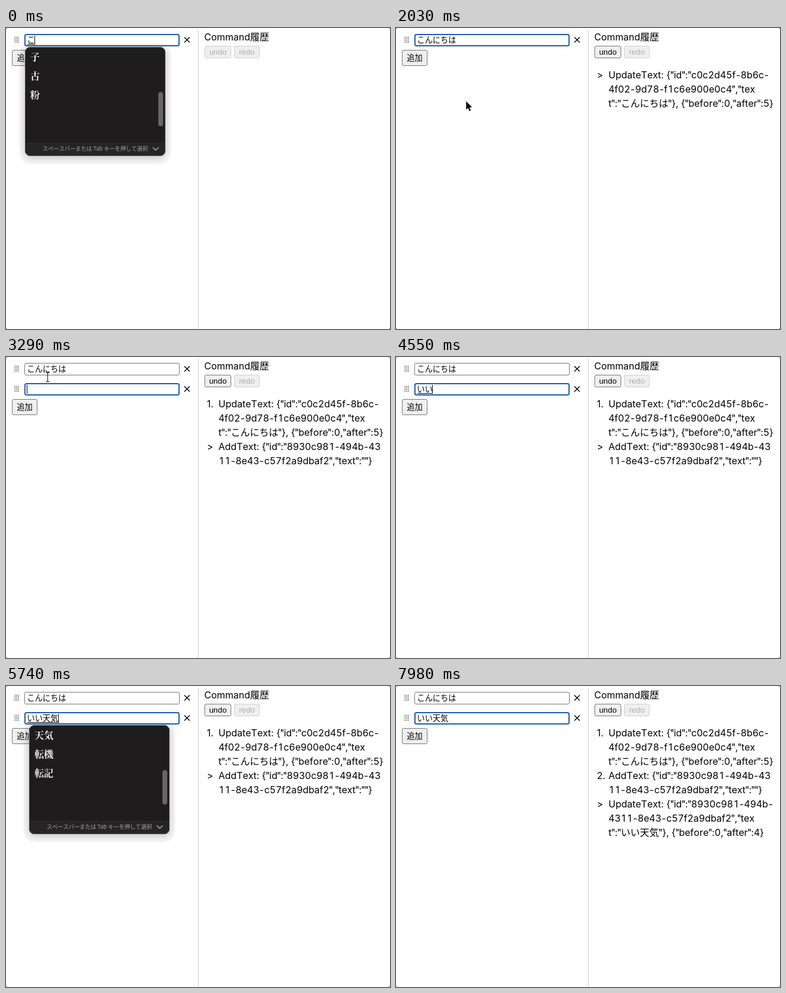
An HTML page with a canvas for the animation above (8000 ms loop, 648 by 508 pixels).

```html
<!DOCTYPE html>
<html lang="ja">
<head>
<meta charset="utf-8">
<title>Command履歴</title>
<style>
html, body { margin: 0; width: 100%; height: 100%; overflow: hidden; background: #fff; }
canvas { display: block; }
</style>
</head>
<body>
<canvas id="stage" width="648" height="508"></canvas>
<script>
const W = 648, H = 508, LOOP = 8000, TICK = 70, ROW = 34;
const ctx = document.getElementById('stage').getContext('2d');
const CJK = '"Noto Sans CJK JP", "Noto Sans CJK", sans-serif';
const BODY = '16px Inter, ' + CJK;
const FIELD = '13.2px ' + CJK;
const MINCHO = 'bold 16px "Noto Serif CJK JP", "Noto Sans CJK JP", serif';

// [time, row, text, composing, caret index (defaults to the end)]
const edits = [
  [0, 0, 'こ', true], [140, 0, 'こn', true], [280, 0, 'こん', true],
  [420, 0, 'こんn', true], [490, 0, 'こんに', true], [700, 0, '今に', true],
  [910, 0, 'こんにち', true], [980, 0, 'こんにちは', true], [1260, 0, 'こんにちは', false],
  [2940, 1, '', false], [4480, 1, 'い', true], [4550, 1, 'いい', true],
  [5040, 1, 'いいて', true], [5180, 1, 'いいてn', true], [5250, 1, 'いいてん', true],
  [5320, 1, 'いいてんk', true], [5530, 1, 'いい天気', true], [5950, 1, 'いい天気', false],
  [7070, 1, 'いい天気', false, 3], [7140, 1, 'いい天気', false, 2],
  [7280, 1, 'いい天気', false, 1], [7420, 1, 'いい天気', false, 0]
];
const caretFlips = [0, 1820, 2310, 2800, 2940, 3500, 3990, 6440, 7000, 7980];

const popups = [
  [0, 140, 0, 0, ['子', '古', '粉']],
  [4830, 5040, 7, ROW, ['良い', '言い', '井伊']],
  [5740, 5950, 7, ROW, ['天気', '転機', '転記']]
];

const history = [
  [1260, ['UpdateText: {"id":"c0c2d45f-8b6c-', '4f02-9d78-f1c6e900e0c4","tex', 't":"こんにちは"}, {"before":0,"after":5}']],
  [2940, ['AddText: {"id":"8930c981-494b-43', '11-8e43-c57f2a9dbaf2","text":""}']],
  [5950, ['UpdateText: {"id":"8930c981-494b-', '4311-8e43-c57f2a9dbaf2","tex', 't":"いい天気"}, {"before":0,"after":4}']]
];

function box(x, y, w, h, r, fill, stroke, line = 1) {
  ctx.beginPath();
  ctx.roundRect(x, y, w, h, r);
  if (fill) { ctx.fillStyle = fill; ctx.fill(); }
  if (stroke) { ctx.strokeStyle = stroke; ctx.lineWidth = line; ctx.stroke(); }
}

function path(points, color, line) {
  ctx.beginPath();
  points.forEach(([x, y]) => ctx.lineTo(x, y));
  ctx.strokeStyle = color;
  ctx.lineWidth = line;
  ctx.stroke();
}

function text(str, x, y, font, color = '#000', align = 'left') {
  ctx.font = font;
  ctx.fillStyle = color;
  ctx.textAlign = align;
  ctx.fillText(str, x, y);
}

// Even figures, tight quotes and long hyphens; letters keep their own advance.
function jsonText(str, x, y) {
  ctx.font = BODY;
  for (const c of str) {
    const own = ctx.measureText(c).width;
    const adv = /\d/.test(c) ? 10.25 : c === '"' ? 5.6 : c === '-' ? 8.3 : own;
    text(c, x + (adv - own) / 2, y, BODY);
    x += adv;
  }
}

function button(label, x, y, w, h, baseline, font, enabled = true, fill = '#efefef') {
  box(x + .5, y + .5, w - 1, h - 1, 2.5, fill, enabled ? '#767676' : '#d0d0d0');
  text(label, x + w / 2, y + baseline, font, enabled ? '#000' : '#adadad', 'center');
}

function field(row, str, focused) {
  const y = row * ROW;
  for (let i = 0; i < 12; i++) {
    ctx.fillStyle = '#555';
    ctx.fillRect(14.4 + i % 3 * 2.8, 14.8 + Math.floor(i / 3) * 2.8, 1.5, 1.5);
  }
  if (focused) box(32, y + 11, 260, 19, 2.5, '#fff', '#1d5dab', 2);
  else box(31.5, y + 10.5, 261, 20, 2.5, '#fff', '#767676');
  text(str, 35.5, y + 24.5, FIELD);
}

function handles(row) {
  const y = row * ROW;
  ctx.fillStyle = '#555';
  for (let i = 0; i < 12; i++) {
    ctx.fillRect(14.4 + i % 3 * 2.8, y + 14.8 + Math.floor(i / 3) * 2.8, 1.5, 1.5);
  }
  path([[301, y + 15.5], [310, y + 24.5]], '#000', 1.4);
  path([[310, y + 15.5], [301, y + 24.5]], '#000', 1.4);
}

function caretX(str) {
  ctx.font = FIELD;
  return Math.round(34.8 + ctx.measureText(str).width);
}

function popup(dx, dy, words) {
  ctx.save();
  ctx.translate(dx, dy);
  box(23, 27, 255, 202, 18, 'rgba(0,0,0,.035)');
  ctx.save();
  ctx.shadowColor = 'rgba(0,0,0,.22)';
  ctx.shadowBlur = 14;
  ctx.shadowOffsetY = 3;
  box(32, 32, 237, 184, 9, '#1e1c1d');
  ctx.restore();
  box(32, 193, 237, 23, [0, 0, 9, 9], '#262525');
  box(32.5, 32.5, 236, 183, 8.5, null, '#484647');
  words.forEach((w, i) => text(w, 41, 55 + i * 32, MINCHO, '#f4f4f4'));
  box(257, 108, 8, 58, 4, '#676566');
  text('スペースバーまたは Tab キーを押して選択', 150.5, 207, '9.3px ' + CJK, '#a3a2a2', 'center');
  path([[247.5, 201.5], [252.5, 206.3], [257.5, 201.5]], '#b4b4b4', 1.3);
  ctx.restore();
}

function arrow(x, y) {
  ctx.beginPath();
  [[0, 0], [0, 14], [3.2, 11], [5.6, 16.6], [8, 15.6], [5.6, 10.2], [10, 10]]
    .forEach(([px, py]) => ctx.lineTo(x + px, y + py));
  ctx.closePath();
  ctx.lineJoin = 'round';
  ctx.strokeStyle = '#fff';
  ctx.lineWidth = 2;
  ctx.stroke();
  ctx.fillStyle = '#000';
  ctx.fill();
}

function beam(x, y) {
  path([[x - 3, y - 8], [x, y - 7], [x + 3, y - 8]], '#000', 1);
  path([[x, y - 7], [x, y + 7]], '#000', 1);
  path([[x - 3, y + 8], [x, y + 7], [x + 3, y + 8]], '#000', 1);
}

function progress(t, from, to) {
  const p = Math.min(1, Math.max(0, (t - from) / (to - from)));
  return p * p * (3 - 2 * p);
}

function pointer(t) {
  if (t >= 2030 && t < 2940) {
    const p = progress(t, 1960, 2800);
    if (t >= 2800) {
      ctx.beginPath();
      ctx.arc(36, 59, 20, 0, 7);
      ctx.fillStyle = 'rgba(255,255,255,.3)';
      ctx.fill();
      ctx.strokeStyle = '#000';
      ctx.lineWidth = 3;
      ctx.stroke();
    }
    arrow(120 - 84 * p, 125 - 67 * p);
  } else if (t >= 2940 && t < 4480) {
    const p = progress(t, 2870, 3500), q = 1 - p;
    beam(q * q * 36 + 2 * p * q * 66 + p * p * 77.5, q * q * 58 + 2 * p * q * 2 + p * p * 53.5);
  }
}

function corners() {
  ctx.beginPath();
  ctx.rect(0, 0, W, H);
  ctx.roundRect(0, 0, W, H, 3);
  ctx.fillStyle = '#777';
  ctx.fill('evenodd');
}

function draw(t) {
  ctx.fillStyle = '#fff';
  ctx.fillRect(0, 0, W, H);
  ctx.fillStyle = '#ccc';
  ctx.fillRect(324, 3, 1, H - 3);

  const values = [''];
  let now;
  for (const e of edits) {
    if (e[0] > t) break;
    now = e;
    values[e[1]] = e[2];
  }
  const [, row, value, composing, index = value.length] = now;
  const pressed = t >= 2800 && t < 2940;

  values.forEach((v, i) => {
    handles(i);
    const y = i * ROW, focused = i === row && !pressed;
    if (focused) box(32, y + 11, 260, 19, 2.5, '#fff', '#1d5dab', 2);
    else box(31.5, y + 10.5, 261, 20, 2.5, '#fff', '#767676');
    text(v, 35.5, y + 24.5, FIELD);
  });
  ctx.fillStyle = '#000';
  if (composing) ctx.fillRect(36, row * ROW + 27, caretX(value) - 36, 1);
  if (caretFlips.filter(f => f <= t).length % 2) {
    ctx.fillRect(caretX(value.slice(0, index)), row * ROW + 13, 1, 15);
  }
  button('追加', 10, 3 + ROW * values.length, 43, 27, 18, '13.333px ' + CJK, true, pressed ? '#f5f5f5' : '#efefef');

  const label = '13.333px "Liberation Sans", Arial, sans-serif';
  text('Command履歴', 334.5, 21, BODY);
  button('undo', 335, 30, 45, 21, 15, label, t >= 1260);
  button('redo', 385, 30, 43, 21, 15, label, false);

  const shown = history.filter(h => h[0] <= t);
  let y = 85;
  shown.forEach(([, lines], i) => {
    text(i === shown.length - 1 ? '>' : i + 1 + '.', 339, y, BODY);
    for (const line of lines) {
      jsonText(line, 358.5, y);
      y += 24;
    }
  });

  for (const [from, to, dx, dy, words] of popups) {
    if (t >= from && t < to) popup(dx, dy, words);
  }
  pointer(t);
  corners();
}

const start = performance.now();
function frame() {
  const t = (performance.now() - start) % LOOP;
  draw(Math.floor(t / TICK) * TICK);
  requestAnimationFrame(frame);
}
frame();
</script>
</body>
</html>
```
